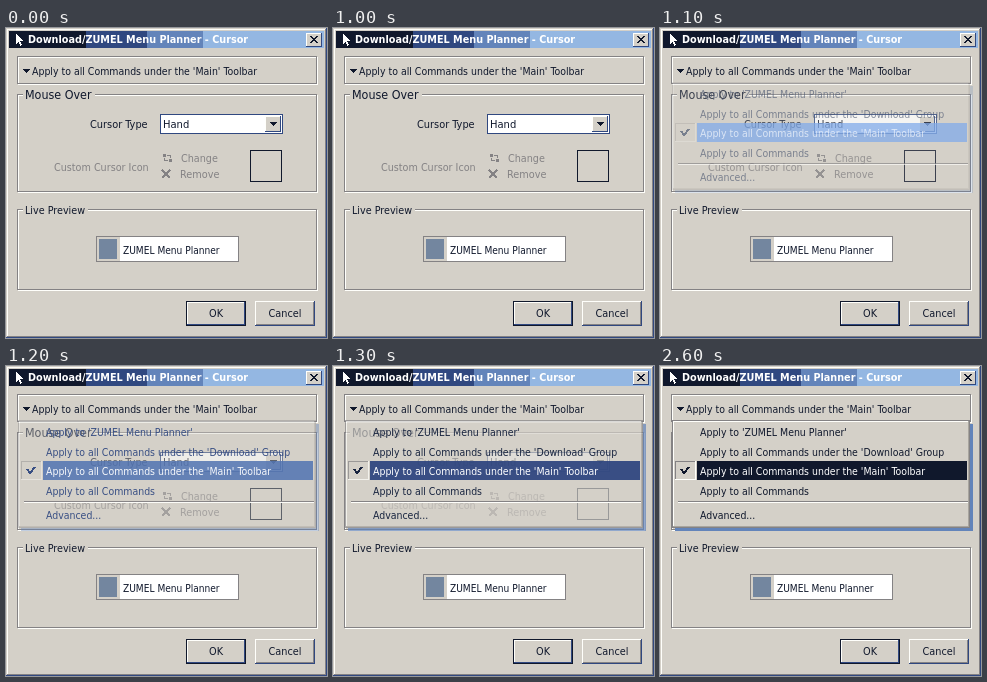
Recreate the animation shown at these times as an HTML page. Size 321 px wide and 310 px high, loop 3.4 s.

```html
<!DOCTYPE html>
<html lang="en">
<head>
<meta charset="utf-8">
<title>Cursor dialog</title>
<style>
  html, body { margin: 0; width: 100%; height: 100%; overflow: hidden; background: #d4d0c8; }
  svg { display: block; width: 321px; height: 310px; }
  text { font-family: Tahoma, "DejaVu Sans Condensed", "Liberation Sans", sans-serif; white-space: pre; }
</style>
</head>
<body>
<svg id="stage" viewBox="0 0 321 310" shape-rendering="crispEdges"></svg>
<script>
const stage = document.getElementById("stage");
const INK = "#10182c", NAVY = "#304880", BLUE = "#6384ba", SKY = "#94b7e2";
const FACE = "#d4d0c8", GREY = "#848284", PALE = "#fffffb";
const PRODUCT = "ZUMEL Menu Planner";

function add(parent, tag, attrs, content) {
  const node = document.createElementNS("http://www.w3.org/2000/svg", tag);
  for (const key in attrs) node.setAttribute(key, attrs[key]);
  if (content) node.textContent = content;
  parent.appendChild(node);
  return node;
}
const group = (parent = stage) => add(parent, "g", {});
const rect = (parent, x, y, width, height, fill) => add(parent, "rect", { x, y, width, height, fill });
const path = (parent, d, fill, stroke = "none", width = 1) =>
  add(parent, "path", { d, fill, stroke, "stroke-width": width });
const label = (parent, x, y, content, size = 10.45, fill = INK, extra = {}) =>
  add(parent, "text", { x, y, "font-size": size, fill, ...extra }, content);
const frame = (parent, x, y, w, h, stroke) =>
  add(parent, "rect", { x: x + .5, y: y + .5, width: w - 1, height: h - 1, fill: "none", stroke });

function bevel(parent, x, y, w, h, light = PALE, dark = GREY) {
  path(parent, `M${x + .5} ${y + h - 1}V${y + .5}H${x + w - 1}`, "none", light);
  path(parent, `M${x} ${y + h - .5}H${x + w - .5}V${y}`, "none", dark);
}
function etched(x, y, w, h) {
  frame(stage, x + 1, y + 1, w - 1, h - 1, PALE);
  frame(stage, x, y, w - 1, h - 1, GREY);
}
function fieldset(y, h, title, size, gap) {
  etched(11, y, 301, h);
  rect(stage, 17, y - 1, gap, 4, FACE);
  label(stage, 19, y + 5, title, size);
}
function button(x, title, isDefault) {
  rect(stage, x, 273, 60, 25, FACE);
  if (isDefault) {
    frame(stage, x, 273, 60, 25, INK);
    bevel(stage, x + 1, 274, 58, 23, PALE, NAVY);
  } else {
    bevel(stage, x, 273, 60, 25, PALE, NAVY);
    path(stage, `M${x + 1} 296.5H${x + 58.5}V274`, "none", GREY);
  }
  label(stage, x + 30, 289, title, 10.8, INK, { "text-anchor": "middle" });
}

function drawWindow() {
  rect(stage, 0, 0, 321, 310, FACE);
  bevel(stage, 0, 0, 321, 310, FACE, NAVY);
  bevel(stage, 1, 1, 319, 308);

  [[3, INK], [80, NAVY], [141, BLUE], [197, SKY]].forEach(
    ([x, color]) => rect(stage, x, 3, 318 - x, 17, color));
  path(stage, "M10 5V16L12.5 13.7L14.3 18L16 17.2L14.2 13H17.6Z", "#fff");
  label(stage, 22, 15, `Download/${PRODUCT} - Cursor`, 10.75, "#fff", { "font-weight": "bold" });
  rect(stage, 300, 5, 16, 14, FACE);
  bevel(stage, 300, 5, 16, 14, PALE, NAVY);
  path(stage, "M304.5 8L311.5 15M311.5 8L304.5 15", "none", INK, 1.2);

  etched(11, 28, 301, 29);
  path(stage, "M17 41H24L20.5 45Z", INK);
  label(stage, 26, 47, "Apply to all Commands under the 'Main' Toolbar");

  fieldset(66, 99, "Mouse Over", 12.4, 72);
  label(stage, 84, 100, "Cursor Type", 10.9);
  rect(stage, 154, 86, 123, 20, "#fff");
  frame(stage, 154, 86, 123, 20, NAVY);
  label(stage, 157, 100, "Hand", 11.1);
  rect(stage, 259, 88, 16, 16, FACE);
  bevel(stage, 259, 88, 16, 16, PALE, NAVY);
  path(stage, "M263 94H271L267 98Z", INK);

  label(stage, 48, 143, "Custom Cursor Icon", 10.7, GREY);
  label(stage, 175, 134, "Change", 10.7, GREY);
  label(stage, 174, 150, "Remove", 10.8, GREY);
  path(stage, "M157 126h3v3h-3zM163 131h3v3h-3zM161 127h4v1h-4zM164 127h1v3h-1zM158 130h1v3h-1zM158 132h4v1h-4z", GREY);
  path(stage, "M156 142L164 150M164 142L156 150", "none", GREY, 2);
  frame(stage, 244, 122, 32, 32, INK);

  fieldset(181, 82, "Live Preview", 10.7, 65);
  rect(stage, 90, 208, 143, 26, "#fff");
  rect(stage, 91, 209, 23, 24, FACE);
  frame(stage, 90, 208, 143, 26, GREY);
  rect(stage, 93, 211, 18, 20, "#73869f");
  label(stage, 117, 226, PRODUCT, 10.1);

  button(180, "OK", true);
  button(249, "Cancel", false);
}

function drawMenu() {
  const panel = group(), bar = group(), items = group();
  rect(panel, 15, 58, 298, 107, BLUE);
  rect(panel, 12, 54, 298, 108, FACE);
  frame(panel, 12, 54, 298, 108, GREY);
  bevel(panel, 13, 55, 296, 106, PALE, "#a8a59f");
  rect(panel, 15, 95, 21, 19, FACE);
  bevel(panel, 15, 95, 21, 19, GREY, PALE);

  const fill = rect(bar, 37, 95, 270, 19, INK);

  [[70, `Apply to '${PRODUCT}'`],
   [90, "Apply to all Commands under the 'Download' Group"],
   [129, "Apply to all Commands"],
   [153, "Advanced..."]].forEach(([y, title]) => label(items, 40, y, title, 10.45, "currentColor"));
  path(items, "M21 103L24 107L29 101", "none", "currentColor", 2);
  rect(items, 18, 135, 290, 1, GREY);
  rect(items, 18, 136, 290, 1, PALE);
  const chosen = label(stage, 40, 109, "Apply to all Commands under the 'Main' Toolbar", 10.45, "#fff");
  return { panel, bar, fill, items, chosen };
}

// The menu fades in by held steps, its selection darkening through blues.
const STEPS = [
  { at: 0, panel: 0, bar: 0, ink: 0, text: INK, select: INK },
  { at: 1100, panel: .22, bar: .75, ink: .65, text: "#4a5670", select: "#82abea" },
  { at: 1200, panel: .4, bar: .85, ink: .95, text: NAVY, select: "#5274b2" },
  { at: 1300, panel: .7, bar: .92, ink: 1, text: "#18243f", select: "#2c447e" },
  { at: 1400, panel: 1, bar: 1, ink: 1, text: INK, select: INK }
];

drawWindow();
const menu = drawMenu();

function render(time) {
  const step = STEPS.filter(s => time >= s.at).pop();
  menu.panel.setAttribute("opacity", step.panel);
  menu.bar.setAttribute("opacity", step.bar);
  menu.fill.setAttribute("fill", step.select);
  menu.items.setAttribute("opacity", step.ink);
  menu.items.style.color = step.text;
  menu.chosen.setAttribute("opacity", step.ink);
}

const start = performance.now();
function tick() {
  render((performance.now() - start) % 3400);
  requestAnimationFrame(tick);
}
tick();
</script>
</body>
</html>
```
